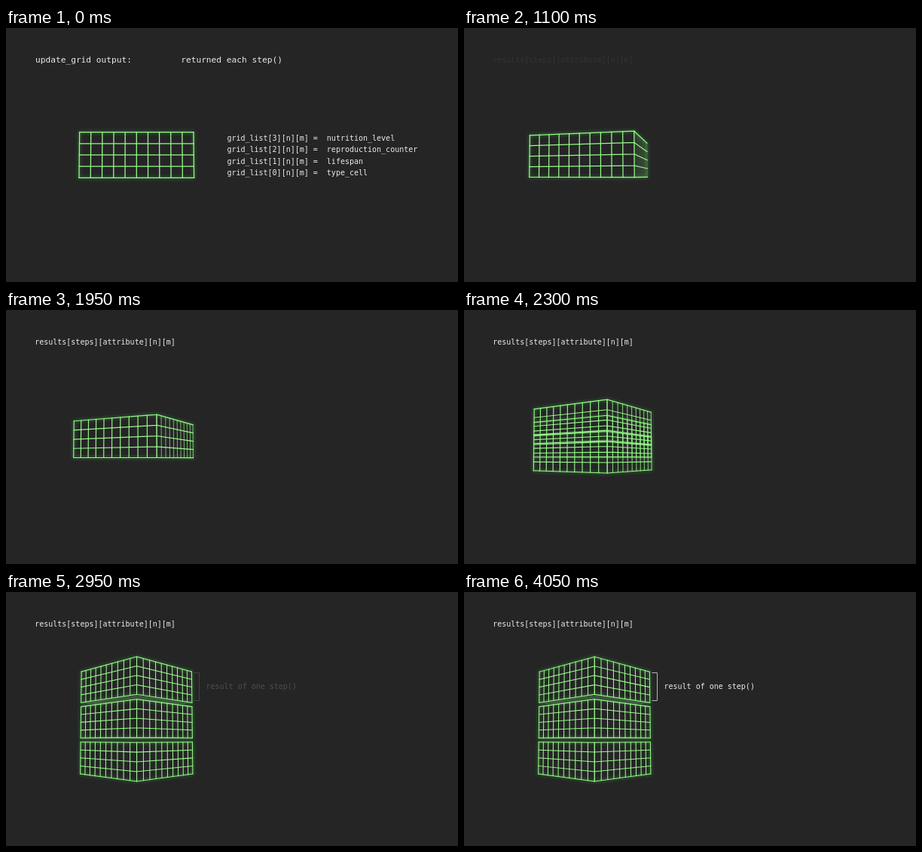
An HTML page for the animation above (4.45 s loop, 600 by 338 pixels).

```html
<!DOCTYPE html>
<html lang="en">
<head>
<meta charset="utf-8">
<title>Grid results</title>
<style>
  html, body { margin: 0; width: 100%; height: 100%; overflow: hidden; background: #252526; }
  svg { display: block; width: 100%; height: 100%; }
  text { font: 10px "DejaVu Sans Mono", "Liberation Mono", monospace; fill: #ebebeb; white-space: pre; }
  .head { font-size: 11.2px; }
  path { fill: none; }
  #glow { stroke: #4dff4d; stroke-width: 2.2; opacity: .36; }
  .line { stroke: #99fb8b; stroke-linecap: square; }
  #under { stroke: #a6c8a0; stroke-width: .5; opacity: .4; }
</style>
</head>
<body>
<svg viewBox="0 0 600 338">
  <defs>
    <filter id="blur" filterUnits="userSpaceOnUse" x="60" y="50" width="230" height="240">
      <feGaussianBlur stdDeviation="2.2"/>
    </filter>
    <clipPath id="gap0"><path id="clip0"/></clipPath>
    <clipPath id="gap1"><path id="clip1"/></clipPath>
  </defs>
  <rect width="600" height="338" fill="#252526"/>

  <g id="intro">
    <text class="head" x="39" y="45.6">update_grid output:</text>
    <text class="head" x="232.2" y="45.6">returned each step()</text>
    <text x="293.4" y="149.6">grid_list[3][n][m] =  nutrition_level</text>
    <text x="293.4" y="165.2">grid_list[2][n][m] =  reproduction_counter</text>
    <text x="293.4" y="180.8">grid_list[1][n][m] =  lifespan</text>
    <text x="293.4" y="196.4">grid_list[0][n][m] =  type_cell</text>
  </g>
  <text id="title" x="38.2" y="46">results[steps][attribute][n][m]</text>

  <path id="glow" filter="url(#blur)"/>
  <g id="under">
    <path id="under0" clip-path="url(#gap0)"/>
    <path id="under1" clip-path="url(#gap1)"/>
  </g>
  <path id="rows" class="line"/>
  <path id="leftCols" class="line"/>
  <path id="rightCols" class="line"/>

  <g id="note">
    <path d="M249.5 107.5H256.5V144.5H249.5" stroke="#b4b4b4"/>
    <text x="265.5" y="128.6">result of one step()</text>
  </g>
</svg>
<script>
const LOOP = 4450, STEP = 50;
const COLS = 10, ROWS = 4, HALF = COLS / 2;
const CX = 173.3, CY = 173.4, FOCAL = 408;
const PITCH = 0.0593;
const YAW = [[150, 0], [650, 8.5], [1550, 23.5], [2300, 35.1], [2700, 41.06], [2960, 45]];

const $ = id => document.getElementById(id);
const ramp = (t, from, to) => Math.min(1, Math.max(0, (t - from) / (to - from)));

function track(keys, t) {
  let value = keys[0][1];
  for (let i = 1; i < keys.length; i++) {
    const [t0, v0] = keys[i - 1], [t1, v1] = keys[i];
    value += (v1 - v0) * ramp(t, t0, t1);
  }
  return value;
}

// Camera looking slightly upward at a block turned about its vertical axis
function camera(yaw, dist) {
  const c = Math.cos(yaw), s = Math.sin(yaw);
  const cp = Math.cos(PITCH), sp = Math.sin(PITCH);
  return (x, y, z) => {
    const rx = x * c + z * s, rz = z * c - x * s;
    const k = FOCAL / (dist + rz * cp + y * sp);
    return [CX + rx * k, CY - (y * cp - rz * sp) * k];
  };
}

const pt = p => p[0].toFixed(2) + " " + p[1].toFixed(2);
const line = (...points) => "M" + points.map(pt).join("L");

function draw(t) {
  const yaw = track(YAW, t) * Math.PI / 180;
  const dist = 31.84 + 7.25 * Math.pow(ramp(t, 650, 2960), 1.31);
  const gap = 4.52 * ramp(t, 1970, 2930);
  const at = camera(yaw, dist);

  const left = (u, y) => at(u - HALF, y, -HALF);
  const right = (u, y) => at(HALF, y, u - HALF);
  const nearX = left(COLS, 0)[0], farX = right(COLS, 0)[0];
  const sideSeen = farX > nearX;
  const centres = gap > 0 ? [gap, 0, -gap] : [0];

  let rows = "", leftCols = "", rightCols = "", glow = "";
  for (const mid of centres) {
    const lo = mid - ROWS / 2, hi = mid + ROWS / 2;
    for (let r = 0; r <= ROWS; r++) {
      rows += line(left(0, lo + r), left(COLS, lo + r));
      if (sideSeen) rows += line(right(0, lo + r), right(COLS, lo + r));
    }
    for (let c = 0; c <= COLS; c++) {
      leftCols += line(left(c, lo), left(c, hi));
      if (sideSeen) rightCols += line(right(c, lo), right(c, hi));
    }
    const end = sideSeen ? right : left;
    glow += line(left(0, lo), left(0, hi), left(COLS, hi), end(COLS, hi),
                 end(COLS, lo), left(COLS, lo)) + "Z";
  }
  $("rows").setAttribute("d", rows);
  $("leftCols").setAttribute("d", leftCols);
  $("rightCols").setAttribute("d", rightCols);
  $("glow").setAttribute("d", glow);

  // columns get thinner on a face turned away
  const weight = FOCAL / dist * 0.1;
  const colWeight = width => Math.min(weight, width / COLS * 0.14);
  $("rows").setAttribute("stroke-width", weight);
  $("leftCols").setAttribute("stroke-width", colWeight(nearX - left(0, 0)[0]));
  $("rightCols").setAttribute("stroke-width", colWeight(Math.max(0, farX - nearX)));

  // undersides seen through the gaps
  for (let i = 0; i < 2; i++) {
    let d = "", clip = "";
    if (gap > ROWS) {
      const y = centres[i] - ROWS / 2, top = centres[i + 1] + ROWS / 2;
      for (let c = 0; c <= COLS; c++) {
        const v = c - HALF;
        d += line(at(v, y, -HALF), at(v, y, HALF)) + line(at(-HALF, y, v), at(HALF, y, v));
      }
      const l = left(0, top);
      clip = line(l, left(COLS, top), right(COLS, top)) + "V0H" + l[0].toFixed(2) + "Z";
    }
    $("under" + i).setAttribute("d", d);
    $("clip" + i).setAttribute("d", clip);
  }

  $("intro").setAttribute("opacity", 1 - ramp(t, 200, 800));
  $("title").setAttribute("opacity", ramp(t, 1060, 1640));
  $("note").setAttribute("opacity", ramp(t, 2830, 3420));
}

const start = performance.now();
function tick() {
  const t = (performance.now() - start) % LOOP;
  draw(Math.floor(t / STEP) * STEP);
  requestAnimationFrame(tick);
}
draw(0);
requestAnimationFrame(tick);
</script>
</body>
</html>
```
